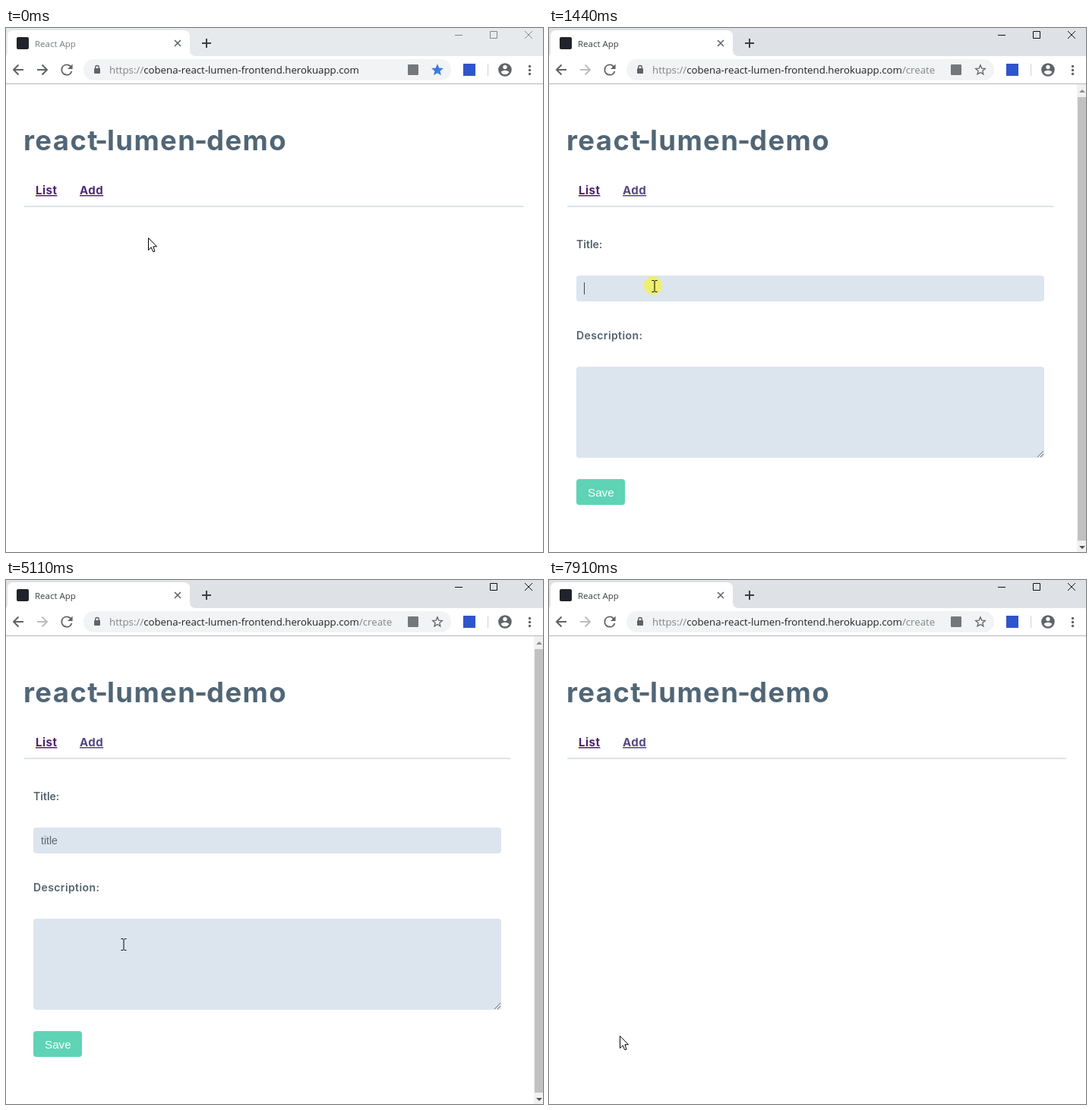
Animation of 707x690 px, one loop 8 s. Source, as an HTML page:

```html
<!DOCTYPE html>
<html lang="en">
<head>
<meta charset="utf-8">
<title>react-lumen-demo</title>
<style>
  html, body { margin: 0; width: 100%; height: 100%; overflow: hidden; background: #fff; }
  svg { display: block; width: 707px; height: 690px; }
  text { white-space: pre; }
  .ui { font-family: "Open Sans", "Noto Sans", sans-serif; }
  .brand { font-family: Inter, Roboto, sans-serif; font-weight: 700; }
  .heading { font-size: 36.5px; letter-spacing: 1.4px; fill: #516676; }
  .label { font: 600 14px Inter, Roboto, sans-serif; fill: #53626f; }
  .link { font-size: 15px; letter-spacing: .5px; text-decoration: underline; }
  .field { fill: #dce5ee; }
  .input { font: 14px "Liberation Sans", Arial, sans-serif; fill: #59646f; }
  .area { font: 11.67px "Noto Sans Mono", "DejaVu Sans Mono", monospace; fill: #59646f; }
  .line { fill: none; stroke: #5f6368; stroke-width: 2; }
  .thin { fill: none; stroke-width: 1; }
  .glyph { fill: #5f6368; }
</style>
</head>
<body>
<svg viewBox="0 0 707 690">
  <!-- tab strip -->
  <rect id="strip" width="707" height="37"/>
  <path d="M0 37Q2 36 2 31V11Q2 3 10 3H234Q242 3 242 11V29Q242 37 250 37Z" fill="#fff"/>
  <rect x="14" y="12" width="16" height="16" rx="2" fill="#20232a"/>
  <text id="tabTitle" class="ui" x="38" y="25" font-size="11.5">React App</text>
  <path class="line" style="stroke-width:1.6" d="M222 16l8 8m0-8l-8 8"/>
  <path class="line" style="stroke:#3c4043" d="M258 20h12m-6-6v12"/>
  <path id="winButtons" class="thin" d="M591 9.5h10M637.5 4.5h9v9h-9zM683 4l10 10m0-10l-10 10"/>

  <!-- toolbar -->
  <rect y="37" width="707" height="36" fill="#fff"/>
  <rect y="73" width="707" height="1" fill="#b4b6b8"/>
  <path class="line" d="M23 55H10M16.5 48.5L10 55l6.5 6.5"/>
  <path id="forward" class="line" d="M41 55H54M47.5 48.5L54 55l-6.5 6.5"/>
  <path class="glyph" transform="translate(68.6 43.6) scale(.95)" d="M17.65 6.35A7.96 7.96 0 0 0 12 4a8 8 0 1 0 7.73 10h-2.08A6 6 0 1 1 12 6c1.66 0 3.14.69 4.22 1.78L13 11h7V4z"/>
  <rect x="102" y="41" width="484" height="28" rx="14" fill="#f1f3f4"/>
  <rect class="glyph" x="116" y="53" width="8" height="7" rx="1"/>
  <path class="line" style="stroke-width:1.4" d="M117.7 54v-2.2a2.3 2.3 0 0 1 4.6 0V54"/>
  <text class="ui" x="136" y="60" font-size="13.25" fill="#80868b">https://<tspan fill="#202124">cobena-react-lumen-frontend.herokuapp.com</tspan><tspan id="path">/create</tspan></text>
  <rect x="529" y="48" width="14" height="14" rx="1" fill="#74787c"/>
  <path id="star" stroke-width="2" transform="translate(560.4 47.6) scale(.63)" d="M12 17.27L18.18 21l-1.64-7.03L22 9.24l-7.19-.61L12 2 9.19 8.63 2 9.24l5.46 4.73L5.82 21z"/>
  <rect x="602" y="47" width="16" height="16" fill="#2f55cd"/>
  <rect x="634" y="47" width="1" height="16" fill="#cfd1d4"/>
  <path class="glyph" fill-rule="evenodd" transform="translate(646.4 44.4) scale(.88)" d="M12 2a10 10 0 1 0 0 20 10 10 0 0 0 0-20zm0 3a3 3 0 1 1 0 6 3 3 0 0 1 0-6zm0 14.2a7.2 7.2 0 0 1-6-3.22c.03-1.99 4-3.08 6-3.08s5.97 1.09 6 3.08a7.2 7.2 0 0 1-6 3.22z"/>
  <g class="glyph"><circle cx="689.5" cy="50.5" r="1.7"/><circle cx="689.5" cy="55.5" r="1.7"/><circle cx="689.5" cy="60.5" r="1.7"/></g>

  <!-- page -->
  <text class="brand heading" y="161"><tspan x="23">react</tspan><tspan x="117">-</tspan><tspan x="133">lumen</tspan><tspan x="248">-</tspan><tspan x="264">demo</tspan></text>
  <text class="brand link" x="39" y="219" fill="#4f2171">List</text>
  <text id="addLink" class="brand link" x="97" y="219">Add</text>
  <rect id="rule" x="24" y="234" height="2" fill="#d9e4ec"/>
  <rect id="addRule" x="82" y="233.5" width="62" height="2" fill="#8a9fb8"/>

  <g id="form">
    <text class="label" x="36" y="290">Title:</text>
    <rect class="field" x="36" y="326" width="616" height="34" rx="4"/>
    <text id="title" class="input" x="46" y="348"></text>
    <rect id="titleCaret" y="335" width="1" height="16" fill="#3f4a55"/>
    <text class="label" x="36" y="410" letter-spacing=".4">Description:</text>
    <rect class="field" x="36" y="446" width="616" height="120" rx="4"/>
    <path class="thin" stroke="#6b7075" d="M643 565l8-8m-4 8l4-4"/>
    <text id="desc" class="area" x="46" y="471"></text>
    <rect id="descCaret" y="459" width="1" height="14" fill="#3f4a55"/>
    <rect id="button" x="36" y="594" width="64" height="34" fill="#5fd3b5"/>
    <rect id="focus" class="thin" x="35.5" y="593.5" width="65" height="35" rx="1" stroke="#7fb9ee" style="stroke-width:1.5"/>
    <text x="51" y="617" font-family="'Liberation Sans', Arial, sans-serif" font-size="15.2" fill="#fff">Save</text>
    <rect x="695" y="74" width="12" height="616" fill="#f1f1f1"/>
    <rect x="696" y="91" width="11" height="584" fill="#c1c1c1"/>
    <path d="M698 85l4-4 4 4z" fill="#8b8d90"/>
    <path d="M698 682l4 4 4-4z" fill="#505254"/>
  </g>

  <g id="status">
    <path d="M-1 671.5H228q3.5 0 3.5 3.5V691H-1z" fill="#fff" stroke="#d0d2d5"/>
    <text class="ui" x="0" y="687" font-size="11.3" fill="#6c7075">..herokuapp.com/create</text>
  </g>

  <circle id="click" r="12" fill="#f8f52a" opacity=".65"/>
  <g id="pointer" stroke="#000" fill="#fff" stroke-linejoin="round">
    <path id="arrow" d="M.5.5V16.5L4.2 12.9 6.6 18.5H8.6V17L6.9 11.8H11.5z"/>
    <path id="hand" d="M-1 14V2q0-1.8 1.5-1.8T2 2V9q1.5-1.3 3 .4 1.8-1.2 3 .6 3-.8 3.3 2v5q0 2.500-1.800 4.500V23.500H0V21Q-4.500 16-5 13.500q0-2 2-1.500zM2 9v4M5 9.500V13M8 10.500V14"/>
    <path id="beam" fill="none" d="M-3.500-7.500H-1l1 1 1-1H3.500M0-6.500V6.500M-3.500 7.500H-1l1-1 1 1H3.500"/>
  </g>
</svg>
<script>
const LOOP = 8000, STEP = 76;
const PRESS_ADD = 600, OPEN = 750, PRESS_SAVE = 7760, SAVED = 7910;
const el = Object.fromEntries([...document.querySelectorAll('[id]')].map(n => [n.id, n]));

// start time, steps, destination
const moves = [
  [70, 6, 115, 214], [910, 7, 139, 340], [4020, 2, 163, 400],
  [4180, 2, 154, 470], [4490, 1, 155, 480], [7300, 5, 93, 600]
];
const clicks = [[PRESS_ADD, OPEN], [1370, 1520], [4490, 4730], [PRESS_SAVE, SAVED]];
const titleKeys = [2530, 2710, 2830, 3000, 3160];
const descKeys = [6060, 6130, 6210, 6360];
const titleBlink = [[1440, 1980], [2530, 3700], [4255, 4490]];
const descBlink = [[4560, 5110], [5680, 6910], [7450, PRESS_SAVE]];

const during = (t, spans) => spans.some(([a, b]) => t >= a && t < b);
const show = (node, on) => node.style.display = on ? '' : 'none';
const set = (node, attrs) => Object.entries(attrs).forEach(([k, v]) => node.setAttribute(k, v));
const ease = p => (1 - Math.cos(Math.PI * p)) / 2;

function pointerAt(t) {
  let x = 187, y = 276;
  for (const [start, steps, toX, toY] of moves) {
    if (t < start) break;
    const p = ease(Math.min(1, (Math.floor((t - start) / STEP) + 1) / steps));
    x += (toX - x) * p;
    y += (toY - y) * p;
  }
  return [Math.round(x), Math.round(y)];
}

function type(name, word, keys, blink, t) {
  const text = word.slice(0, keys.filter(k => t >= k).length);
  if (el[name].textContent !== text) el[name].textContent = text;
  const caret = el[name + 'Caret'];
  show(caret, during(t, blink));
  caret.setAttribute('x', 46 + Math.round(text ? el[name].getComputedTextLength() : 0));
}

function draw(t) {
  const active = t >= PRESS_ADD, routed = t >= OPEN, form = routed && t < SAVED;
  const [x, y] = pointerAt(t);
  const inside = (l, top, r, b) => x >= l && x <= r && y >= top && y <= b;
  const onAdd = inside(82, 200, 144, 236);
  const onSave = form && inside(36, 594, 100, 628);
  const onField = form && (inside(36, 326, 652, 360) || inside(36, 446, 652, 566));

  set(el.strip, { fill: active ? '#dee1e6' : '#e7eaed' });
  set(el.tabTitle, { fill: active ? '#3c4043' : '#777b80' });
  set(el.winButtons, { stroke: active ? '#111' : '#858789' });
  el.forward.style.stroke = routed ? '#bcbec1' : '#5f6368';
  set(el.star, routed ? { fill: 'none', stroke: '#5f6368' } : { fill: '#3b7bdc', stroke: '#3b7bdc' });
  show(el.path, routed);
  set(el.addLink, { fill: routed ? '#554682' : '#4f2a78' });
  set(el.rule, { width: form ? 640 : 657 });
  show(el.addRule, onAdd);

  show(el.form, form);
  type('title', 'title', titleKeys, titleBlink, t);
  type('desc', 'test', descKeys, descBlink, t);
  const pressed = t >= PRESS_SAVE;
  set(el.button, { fill: onSave ? '#7bdac0' : '#5fd3b5', rx: pressed ? 1 : 4 });
  show(el.focus, pressed);

  show(el.status, t >= 520 && t < 1440);
  el.status.style.opacity = Math.min(1, Math.max(0, (1440 - t) / 230));

  show(el.click, during(t, clicks));
  set(el.click, { cx: x - (onField ? 2 : 0), cy: y - (onField ? 1 : 0) });
  set(el.pointer, { transform: `translate(${x} ${y})` });
  const hand = onAdd || onSave;
  show(el.hand, hand);
  show(el.beam, onField);
  show(el.arrow, !hand && !onField);
}

function frame() {
  draw(performance.now() % LOOP);
  requestAnimationFrame(frame);
}
frame();
</script>
</body>
</html>
```
